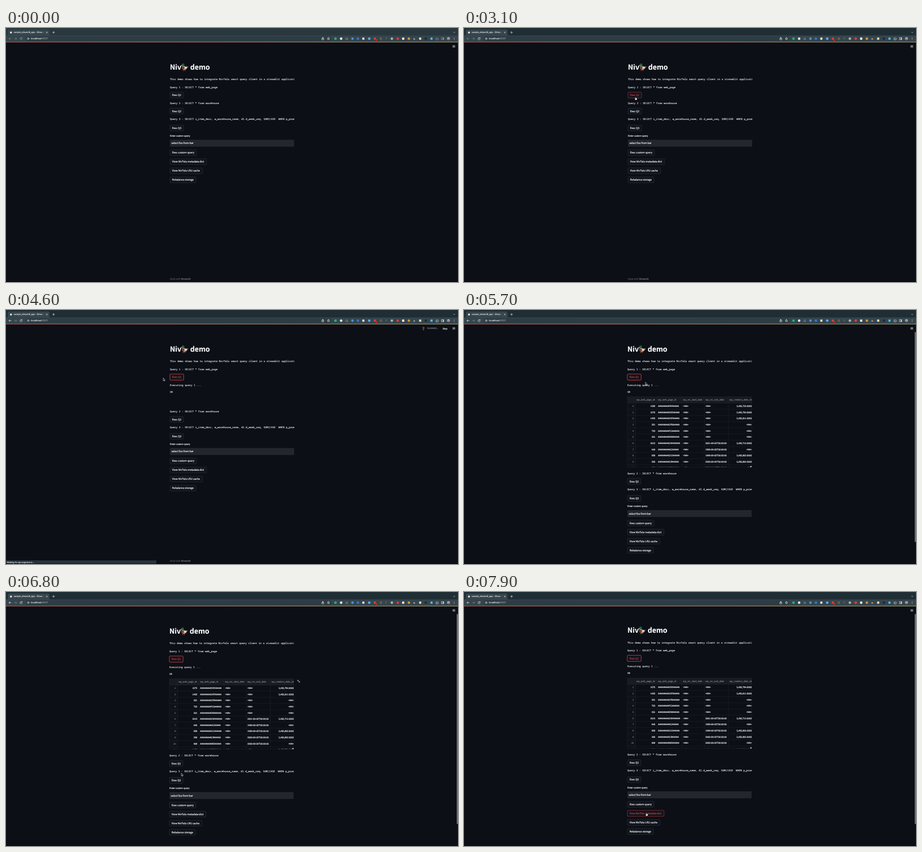
An HTML page that plays this animation: 998x561 px, repeating every 8 s.

```html
<!DOCTYPE html>
<html lang="en">
<head>
<meta charset="utf-8">
<title>Streamlit demo</title>
<style>
html, body { margin: 0; width: 100%; height: 100%; overflow: hidden; background: #0c0f16; }
svg { display: block; width: 998px; height: 561px; }
text, tspan { white-space: pre; text-rendering: geometricPrecision; fill: var(--ink); stroke: var(--ink); stroke-width: .2; }
text { --ink: #fafafa; }
.sans { font-family: "Noto Sans CJK JP", "Noto Sans CJK SC", "Open Sans", sans-serif; font-weight: 500; }
.mono { font-family: "Noto Sans Mono", monospace; stroke-width: .12; }
.ui { font-family: Inter, Roboto, sans-serif; stroke-width: .1; }
.grey { --ink: #a0a2a8; stroke-width: .08; }
.dim { --ink: #6c6f76; stroke-width: .05; }
.end { text-anchor: end; }
.bold { font-weight: 700; }
.line { fill: none; stroke: #e8eaed; stroke-width: .8; stroke-linecap: round; stroke-linejoin: round; }
.off { stroke: #7b888e; }
.wakes { stroke: #9aa5aa; }
.orange { stroke: #e58a2c; }
.strip { fill: #29373e; }
.awake .strip { fill: #1f2d34; }
.awake .wakes, .visited .back { stroke: #f1f3f4; }
.btn rect { fill: #10141c; stroke: #3d4047; stroke-width: .5; }
.btn.hot rect, .btn.focus rect { stroke: #ff4b4b; }
.btn.hot text, .btn.focus text { --ink: #f04848; stroke-width: .08; }
.btn .ring { display: none; }
.btn.focus .ring { display: inline; fill: none; stroke: #ff4b4b; stroke-opacity: .5; stroke-width: 1; }
.grid { stroke: #262932; stroke-width: .5; }
</style>
</head>
<body>
<script>
const LOOP = 8000, FOCUS = 700, CLICK = 3200, RUN = 4100, STATUS = 4200,
  TABLE = 4800, ROW_SCROLL = 6300, PAGE_SCROLL = 7200;
const SIZE = 5.6, SMALL = 4.87, ROW = 13.65;

const esc = s => String(s).replace(/</g, "&lt;").replace(/>/g, "&gt;");
// y is the middle of the capital letters
const text = (s, x, y, size = SIZE, cls = "sans") =>
  `<text x="${x}" y="${y + size * .36}" font-size="${size}" class="${cls}">${esc(s)}</text>`;
const mono = (s, y) => text(s, 362, y, 5.47, "mono");
const rect = (x, y, w, h, fill, r = 0) =>
  `<rect x="${x}" y="${y}" width="${w}" height="${h}" rx="${r}" fill="${fill}"/>`;
const dot = (x, y, r, fill) => `<circle cx="${x}" cy="${y}" r="${r}" fill="${fill}"/>`;
const line = (d, cls = "") => `<path class="line ${cls}" d="${d}"/>`;
const shape = (d, fill) => `<path d="${d}" fill="${fill}"/>`;

const buttons = [];
function button(label, y, w) {
  buttons.push({ y, w });
  return `<g class="btn"><rect class="ring" x="361.5" y="${y - 7}" width="${w + 1}" height="14" rx="2"/>
    <rect x="362" y="${y - 6.5}" width="${w}" height="13" rx="1.6"/>${text(label, 366.8, y)}</g>`;
}

function browser() {
  const blue = "#4a8fe0", red = "#d93f38", pale = "#d5d9db", orange = "#e58a2c";
  // [x, colour, round]
  const extensions = [[727.5, "#21b36f", 1], [740, "#e4e7e8", 1], [765, blue, 1], [777, "#3678c9", 0],
    [789, pale, 0], [802, "#58aee0", 1], [814.5, red, 0], [852, "#a9b0b4", 1], [865, red, 1], [877, "#eef0f0", 0],
    [889.5, orange, 1], [914.5, "#d8d6b8", 0], [927, "#20292e", 0], [939.5, "#4eb3e8", 0]];
  return `<rect class="strip" width="998" height="17"/>` + rect(0, 16.5, 998, 14, "#36454c") +
    shape("M1 17Q4 17 4 14V6Q4 3.3 7 3.3H93Q96 3.3 96 6V14Q96 17 99 17Z", "#36454c") +
    dot(11, 10, 2.2, "#dfe3e5") +
    text("sample_streamlit_app - Strea", 17, 9.7, 4.6, "ui") + text("m", 80, 9.7, 4.6, "ui dim") +
    line("M88.7 8.3L91.7 11.3M91.7 8.3L88.7 11.3M102.6 9.8H107.4M105 7.4V12.2M988 9L989.6 10.6L991.2 9") +
    rect(43, 18.3, 676, 10.4, "#2e3c43", 5.2) +
    line("M11.5 23.5H6.5M8.7 21.2L6.4 23.5L8.7 25.8", "off back") +
    line("M18.5 23.5H23.5M21.3 21.2L23.6 23.5L21.3 25.8", "off") +
    line("M35.3 22.3A2.4 2.4 0 1 0 35.6 24.3M35.6 20.9V22.7H33.8", "wakes") +
    `<circle class="line" cx="49" cy="23.5" r="2.1" style="stroke-width:.6"/>` +
    line("M49 23.4V24.5M49 22.4V22.5") +
    `<text class="ui" x="55" y="25.4" font-size="5.5">localhost<tspan class="grey">:8501</tspan></text>` +
    line("M698.3 22.6H697.3V26H701.7V22.6H700.7M699.5 24.5V20.6M698.3 21.7L699.5 20.5L700.7 21.7") +
    line("M712 20.8L712.8 22.6L714.7 22.8L713.3 24.1L713.7 26L712 25L710.3 26L710.7 24.1L709.3 22.8L711.2 22.6Z") +
    extensions.map(([x, c, round]) => round ? dot(x, 23.5, 2.7, c) : rect(x - 2.4, 21.1, 4.8, 4.8, c, .6)).join("") +
    line("M750 25.6H755M750.6 21.7H754.4V24.6H750.6Z", "off") +
    rect(815.5, 24.2, 4.3, 4.4, "#b3150f", .7) + text("1", 816.7, 26.4, 3.4, "ui") +
    line("M826.8 21.3Q825.5 23.5 826.8 25.7M828.6 21.3Q829.9 23.5 828.6 25.7", "orange") +
    text("?", 838, 23.5, 5, "ui grey") + text("A", 899.5, 23.7, 5, "ui") + text("·", 903.6, 23.7, 5, "ui") +
    line("M950 22.2H951.2A.9.9 0 0 1 952.8 22.2H954V23.4A.9.9 0 0 1 954 25V26H950Z", "wakes") +
    line("M962 21.4H966.6V25.8H962ZM965 21.6V25.7M965.8 21.6V25.7", "wakes") +
    dot(977, 23.3, 3.4, "#8794ad") + dot(977, 22.3, 1.2, "#c7a5a0") +
    shape("M974.5 25.6Q977 22.4 979.5 25.6Q977 27.6 974.5 25.6Z", "#c2566a") +
    [21.3, 23.4, 25.5].map(y => dot(989.5, y, .55, "#e8eaed")).join("") +
    rect(0, 30.4, 998, 1.3, "url(#deco)");
}

const duck = shape("M392.6 91.6L392 94.4H390.2M395.8 91.8L395.6 94.4H393.8", "#e9893a") +
  shape("M388.8 85Q387.6 90.5 391.5 92Q397 93.4 400 88.6L402.9 85.4Q397.5 86 393.5 84Z", "#b3aaa2") +
  shape("M389.2 84.5Q387 90 391 91.8Q395 91.8 393.6 84Z", "#7a3f2c") +
  shape("M393.5 86.6Q398 85.6 402.9 85.3Q399.5 89 395.6 89.2Z", "#e0dad3") +
  shape("M399.3 86.2L402.9 85.3L400.6 88Z", "#3b2c2a") +
  rect(389, 83.6, 4.6, 1, "#f1f1ee") +
  `<ellipse cx="391.1" cy="81.2" rx="2.8" ry="3" fill="#19693f"/>` +
  shape("M388.9 81.2L386 82.8Q387 84.2 389.6 83Z", "#e7b62f") + dot(390.2, 80.6, .5, "#111");

function table() {
  const NA = "<NA>", cols = [379.7, 427.3, 482.5, 532, 585];
  const heads = ["wp_web_page_sk", "wp_web_page_id", "wp_rec_start_date", "wp_rec_end_date", "wp_creation_date_sk"];
  // key, id letters, end date, last three digits of the creation key
  const rows = [[1285, "FAF", 0, 733], [1075, "DDE", 0, 794], [1455, "OKF", 0, 811], [351, "OFB"], [753, "PCA"],
    [261, "EAB"], [2015, "ONH", "2001-09-02", 712], [640, "AIC", "1999-09-03"], [958, "OLD", "1999-09-03", 803],
    [296, "ICB", "2000-09-02", 802], [968, "IMD", "2000-09-02"], [1172, "EJE", 0, 790]];
  const body = rows.map(([key, id, date, made], i) => {
    const y = 212.2 + i * ROW, cell = (s, x, cls = "") => text(s, x, y, SMALL, "sans " + cls);
    return cell(i, 376, "grey end") + cell(key, 423.5, "end") + cell(`AAAAAAAA${id}AAAAA`, 429.7) +
      cell(NA, 485) + cell(date ? date + "T00:00:00" : NA, 534.3) +
      cell(made ? `2,450,${made}.0000` : NA, 636.6, "end") +
      `<path class="grid" d="M362 ${y + ROW / 2}H636.5"/>`;
  }).join("");
  return rect(362, 191.7, 274.5, 155.3, "#0c0f16") + rect(362, 191.7, 17.7, 155.3, "#0f1219") +
    `<g clip-path="url(#body)"><g id="rows">${body}</g></g>` +
    rect(362, 191.7, 274.5, 13.8, "#191b23") +
    `<g clip-path="url(#column)">` +
    heads.map((h, i) => text(h, cols[i] + 2.5, 198.6, SMALL, "sans grey")).join("") + "</g>" +
    `<path class="grid" d="M362 205.5H636.5${cols.map(x => `M${x} 191.7V347`).join("")}"/>` +
    `<rect x="362" y="191.7" width="274.5" height="155.3" fill="none" class="grid"/>` +
    rect(633.6, 344.8, 2.3, 2.3, "#f4f5f6") +
    `<g id="expand">` +
    line("M645.2 194.9L649.4 199.1M645.2 196.6V194.9H646.9M649.4 197.4V199.1H647.7") + "</g>";
}

const scene = `<svg viewBox="0 0 998 561" xmlns="http://www.w3.org/2000/svg">
<defs>
  <linearGradient id="deco"><stop stop-color="#b9605a"/><stop offset="1" stop-color="#a9a878"/></linearGradient>
  <clipPath id="column"><rect x="361" y="0" width="275.5" height="700"/></clipPath>
  <clipPath id="body"><rect x="362" y="205.5" width="274.5" height="141.5"/></clipPath>
</defs>
<rect width="998" height="561" fill="#0c0f16"/>
<g id="page">
  ${text("Niv", 362, 86.3, 15.4, "sans bold")}${duck}${text("demo", 406.8, 86.3, 15.4, "sans bold")}
  <g clip-path="url(#column)">${mono("This demo shows how to integrate NivTelo smart query client in a streamlit application", 113.5)}</g>
  ${mono("Query 1 : SELECT * from web_page", 130.6)}${button("Exec Q1", 148.2, 30)}
  <g id="output">${mono("Executing query 1 ...", 165.8)}${mono("OK", 181)}</g>
  <g id="table">${table()}</g>
  <g id="rest">
    ${mono("Query 2 : SELECT * from warehouse", 165.8)}${button("Exec Q2", 183.5, 30)}
    <g clip-path="url(#column)">${mono("Query 3 : SELECT i_item_desc, w_warehouse_name, d1.d_week_seq, SUM(CASE  WHEN p_promo_sk", 201)}</g>
    ${button("Exec Q3", 220.9, 30)}
    ${text("Enter custom query", 362, 238.5, SMALL)}
    ${rect(362, 246.8, 274.3, 15.4, "#24262e", 1.5)}${text("select foo from bar", 365.2, 254.4)}
    ${button("Exec custom query", 275.4, 58.7)}${button("View NivTelo metadata dict", 295.4, 80.8)}
    ${button("View NivTelo LRU cache", 315.4, 72)}${button("Rebalance storage", 335.4, 57.4)}
  </g>
</g>
<text id="footer" class="sans dim" x="362" y="555.7" font-size="${SMALL}">Made with <tspan class="grey">Streamlit</tspan></text>
<g id="running">
  ${dot(921.8, 38, .9, "#777a80")}${line("M919 39.7H924.6M921.8 39.7V42M921.8 42L920.6 44.6M921.8 42L923 44.6", "off")}
  ${text("RUNNING...", 930, 40.8, 4.7, "sans grey")}${text("Stop", 964, 40.8, 4.9)}
</g>
${line("M986.3 38.9H991.3M986.3 40.6H991.3M986.3 42.3H991.3")}
<g id="scrollbar">${rect(995.3, 48.5, 2.4, 464, "#7b7f84", 1.2)}</g>
<g id="status">${rect(0, 553, 332, 8, "#27343b")}${text("Waiting for api.segment.io...", 2, 557, 4.6, "ui")}</g>
${rect(0, 560.2, 998, .8, "#000")}
<g id="chrome">${browser()}</g>
<g id="cursor">
  <path id="arrow" d="M0 0V6.2L1.5 4.9L2.5 7.1L3.5 6.7L2.5 4.5H4.4Z" fill="#111" stroke="#fff" stroke-width=".6"/>
  <path id="hand" d="M-.6 .5Q0-.4.6.5V2.5L2.6 3Q3.2 3.4 3 4.3L2.4 6.3H-.6L-2.2 4Q-2 3-.6 3.7Z" fill="#fff" stroke="#111" stroke-width=".3"/>
</g>
</svg>`;
document.body.insertAdjacentHTML("afterbegin", scene);

const $ = id => document.getElementById(id);
const show = (id, on) => { $(id).style.display = on ? "" : "none"; };
const move = (id, x, y) => $(id).setAttribute("transform", `translate(${x} ${y})`);
const buttonNodes = [...document.querySelectorAll(".btn")];

// time, x, y of the pointer tip
const path = [[650, 392, 326], [1000, 385, 235], [1300, 378, 222], [1600, 379, 222], [1800, 383, 239.5],
  [2000, 391, 250], [2300, 385, 195], [2600, 379, 150], [2800, 379, 152.5], [3900, 379, 152.5],
  [4600, 347, 150], [5100, 350, 150], [5700, 400.5, 159.5], [6100, 420, 230], [6500, 410, 290],
  [6800, 387, 400], [7200, 382, 420], [7500, 398, 470], [7700, 403, 488], [8000, 403, 488]];

function pointer(t) {
  const i = path.findIndex(p => p[0] > t);
  if (i < 1) return [-99, -99];
  const [a, b] = [path[i - 1], path[i]];
  const k = (t - a[0]) / (b[0] - a[0]), e = k * k * (3 - 2 * k);
  return [a[1] + (b[1] - a[1]) * e, a[2] + (b[2] - a[2]) * e];
}

function draw() {
  const t = performance.now() % LOOP, wide = t >= TABLE;
  const px = wide ? -1.2 : 0, py = t >= PAGE_SCROLL ? -1.6 : 0;
  const drop = wide ? 195.1 : t >= RUN ? 58 : 0;
  move("page", px, py);
  move("rest", 0, drop);
  move("rows", 0, t >= ROW_SCROLL ? -ROW : 0);
  show("output", t >= RUN);
  show("table", wide);
  show("expand", t >= 6000 && t < 7000);
  show("scrollbar", wide);
  show("footer", !wide);
  show("running", t >= RUN && !wide);
  show("status", t >= STATUS && !wide);
  $("chrome").classList.toggle("awake", t >= FOCUS);
  $("chrome").classList.toggle("visited", t >= CLICK);

  // hover styling trails the pointer a little
  const [hx, hy] = pointer(t - 200);
  let over = false;
  buttons.forEach(({ y, w }, i) => {
    const x = hx - px - 362, dy = hy - py - y - (i ? drop : 0);
    const hot = x > 0 && x < w && Math.abs(dy) < 6.5;
    over ||= hot;
    buttonNodes[i].classList.toggle("hot", hot);
    buttonNodes[i].classList.toggle("focus", i === 0 && t >= CLICK);
  });
  move("cursor", ...pointer(t));
  show("hand", over);
  show("arrow", !over);
  requestAnimationFrame(draw);
}
draw();
</script>
</body>
</html>
```
